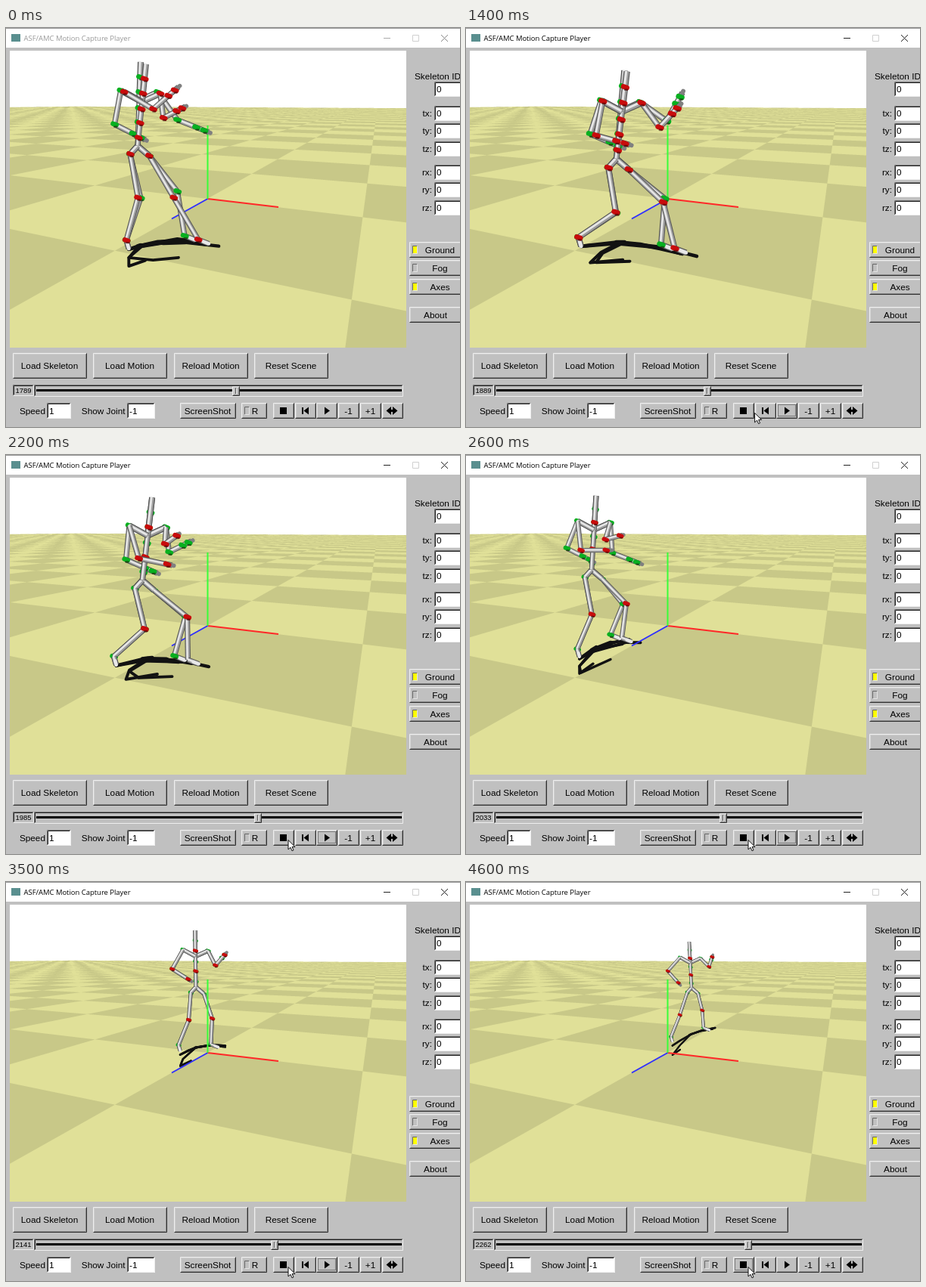
These frames come from a looping animation (600x528 px, 4700 ms). An HTML page with a canvas:

```html
<!DOCTYPE html>
<html lang="en">
<head>
<meta charset="utf-8">
<title>Motion Capture Player</title>
<style>
  html, body { margin: 0; width: 600px; height: 528px; overflow: hidden; background: #c0c0c0; }
  canvas, svg { position: absolute; display: block; }
  canvas { left: 5px; top: 30px; }
  svg { left: 0; top: 0; }
  text { font: 11.8px "Liberation Sans", Arial, sans-serif; white-space: pre; }
  .title { font: 9.45px "Open Sans", "Noto Sans", sans-serif; }
  .counter { font-size: 9.5px; }
</style>
</head>
<body>
<canvas id="floor" width="524" height="393"></canvas>
<canvas id="scene" width="524" height="393"></canvas>
<svg id="ui" width="600" height="528" viewBox="0 0 600 528"></svg>
<script>
const LOOP = 4700, STEP = 100, CLICK_PLAY = 567, CLICK_STOP = 4510;
const VIEW = { x: 5, y: 30, w: 524, h: 393, cx: 266, cy: 226, focal: 474 };
const lerp = (a, b, k) => a + (b - a) * k;
const mix = (p, q, k) => [lerp(p[0], q[0], k), lerp(p[1], q[1], k)];
const clamp = (v, low, high) => Math.min(Math.max(v, low), high);
const ramp = (t, from, to) => clamp((t - from) / (to - from), 0, 1);
const ease = (t, from, to) => { const k = ramp(t, from, to); return k * k * (3 - 2 * k); };

// ---------- Ground: a square checkerboard seen in perspective ----------
function paintFloor() {
  const ctx = document.getElementById('floor').getContext('2d');
  const image = ctx.createImageData(VIEW.w, VIEW.h);
  const pitch = 15 * Math.PI / 180, yaw = 24.7 * Math.PI / 180;
  const sp = Math.sin(pitch), cp = Math.cos(pitch), sy = Math.sin(yaw), cy = Math.cos(yaw);
  const tile = 0.4, extent = 50, sub = 4;
  const sky = [255, 255, 255], light = [224, 224, 152], dark = [200, 200, 136];

  function colorAt(px, py) {
    const dx = (px - VIEW.cx) / VIEW.focal, dy = (py - VIEW.cy) / VIEW.focal;
    const reach = sp / (sp + dy * cp);
    const right = reach * dx, toward = cp + reach * (dy * sp - cp);
    const u = Math.floor((right * cy + toward * sy) / tile);
    const v = Math.floor((toward * cy - right * sy) / tile);
    if (reach < 0 || u < -extent || v < -extent) return sky;
    return (u + v) % 2 ? light : dark;
  }
  for (let y = 0; y < VIEW.h; y++) for (let x = 0; x < VIEW.w; x++) {
    const sum = [0, 0, 0];
    for (let i = 0; i < sub * sub; i++) {
      const sample = colorAt(x + VIEW.x + (i % sub + .5) / sub, y + VIEW.y + (Math.floor(i / sub) + .5) / sub);
      sample.forEach((c, j) => { sum[j] += c / (sub * sub); });
    }
    image.data.set([...sum, 255], (y * VIEW.w + x) * 4);
  }
  ctx.putImageData(image, 0, 0);
}

// ---------- Key poses: ends of the body only, joints are solved ----------
const keys = [
  { time: 570, head: [178, 45], hips: [174, 156], handL: [184, 148], handR: [268, 138],
    footL: [159, 281], footR: [236, 275], twinL: [228, 78], twinR: [237, 104] },
  { time: 800, head: [210, 54], hips: [208, 170], handL: [187, 147], handR: [322, 79],
    footL: [160, 281], footR: [272, 286], twinR: [330, 99] },
  { time: 1900, head: [209, 58], hips: [191, 176], handL: [224, 168], handR: [256, 91],
    footL: [139, 274], footR: [246, 287], twinL: [241, 161], twinR: [244, 104] },
  { time: 2600, head: [172, 54], hips: [166, 152], handL: [168, 141], handR: [231, 144],
    footL: [147, 257], footR: [191, 238], twinL: [191, 126], twinR: [207, 106] },
  { time: 3100, head: [217, 58], hips: [215, 143], handL: [206, 136], handR: [264, 92],
    footL: [186, 223], footR: [229, 232] },
  { time: 3900, head: [283, 70], hips: [287, 135], handL: [283, 126], handR: [318, 96],
    footL: [270, 209], footR: [313, 198] },
  { time: 4500, head: [295, 79], hips: [298, 140], handL: [283, 136], handR: [326, 97],
    footL: [271, 205], footR: [314, 193] }
];

function poseAt(time) {
  const t = clamp(time, keys[0].time, keys[keys.length - 1].time);
  const i = Math.max(1, keys.findIndex(k => k.time >= t));
  const a = keys[i - 1], b = keys[i], k = (t - a.time) / (b.time - a.time);
  const at = (part, fallback = part) => mix(a[part] || a[fallback], b[part] || b[fallback], k);
  const own = {};
  for (const part of ['head', 'hips', 'handL', 'handR', 'footL', 'footR']) own[part] = at(part);

  // The second performer leans and steps apart, then falls into the same pose.
  const lean = 7 * (1 - ramp(t, 800, 1900)), apart = 1 - ramp(t, 2500, 3100);
  const twin = {
    ...own,
    head: [own.head[0] + lean, own.head[1] + lean * .4],
    handL: at('twinL', 'handL'),
    handR: at('twinR', 'handR'),
    footR: [own.footR[0] + 18 * apart, own.footR[1] + 5 * apart]
  };
  return [own, twin].map(solve);
}

// Middle joint of a two-bone limb, set off from the line between its ends.
function bend(from, to, length, fold, side) {
  const dx = to[0] - from[0], dy = to[1] - from[1], reach = Math.hypot(dx, dy);
  const off = side * fold * Math.sqrt(Math.max(0, length ** 2 - reach ** 2)) / 2;
  const [mx, my] = mix(from, to, .5);
  return [mx - dy / reach * off, my + dx / reach * off];
}

function solve({ head, hips, handL, handR, footL, footR }) {
  const size = Math.hypot(head[0] - hips[0], head[1] - hips[1]);
  const profile = clamp((size - 55) / 60, 0, 1);
  const chest = mix(head, hips, .46);
  const from = ([x, y], right, down) => [x + right * size, y + down * size];
  const arm = (shoulder, hand) => {
    const length = .8 * size;
    const reach = Math.hypot(hand[0] - shoulder[0], hand[1] - shoulder[1]);
    return [chest, shoulder, bend(shoulder, hand, length, Math.min(1.1, .25 + reach / length), 1), hand];
  };
  const leg = (hip, ankle, toe) => [hips, hip, bend(hip, ankle, 1.1 * size, .8 * profile, -1), ankle, toe];
  return {
    size, profile,
    spine: [head, chest, hips],
    armL: arm(from(chest, -.22, -.12), handL),
    armR: arm(from(chest, .22, -.1), handR),
    legL: leg(from(hips, -.09, .1), footL, from(footL, .03, .1)),
    legR: leg(from(hips, .14, .12), footR, from(footR, .13, .05))
  };
}

// ---------- Scene ----------
const ctx = document.getElementById('scene').getContext('2d');
ctx.translate(-VIEW.x, -VIEW.y);
ctx.lineJoin = 'round';

function line(pts, color, width, cap = 'butt') {
  ctx.beginPath();
  pts.forEach(p => ctx.lineTo(...p));
  ctx.strokeStyle = color;
  ctx.lineWidth = width;
  ctx.lineCap = cap;
  ctx.stroke();
}

function drawAxes() {
  const origin = [266.5, 226];
  line([origin, [360, 237]], '#ff2828', 2);
  line([origin, [219, 252.5]], '#3030ff', 2);
  line([origin, [266.5, 129]], '#38ff38', 2);
}

function bone(a, b, w) {
  const shift = ([x, y]) => [x - w * .1, y - w * .1];
  line([a, b], '#505050', w);
  line([a, b], '#9c9c9c', w * .75);
  line([shift(a), shift(b)], '#e6e6e6', w * .36);
}

function joint([x, y], w, color) {
  line([[x - w * .25, y - w * .1], [x + w * .3, y + w * .1]], color, w * .8, 'round');
  line([[x, y + w * .4], [x + w * .35, y + w * .4]], 'rgba(30,0,0,.5)', w * .3, 'round');
}

function drawFigure(figure, color, everyJoint) {
  const w = figure.size * .072;
  for (const part of ['legR', 'legL', 'armR', 'spine', 'armL']) {
    const chain = figure[part], last = chain.length - 1;
    for (let i = 1; i <= last; i++) bone(chain[i - 1], chain[i], w * (i > 1 ? .9 : 1));
    let joints = chain.slice(1);
    if (part === 'spine') joints = [.18, .36, .55, .72, .9].map(k => mix(chain[0], chain[2], k));
    if (part.startsWith('arm')) {
      const [elbow, hand] = chain.slice(-2);
      joints.splice(-1, 1, mix(elbow, hand, .6), mix(elbow, hand, .85));
      line([mix(elbow, hand, .92), mix(elbow, hand, 1.05)], '#808080', w * .7, 'round');
    }
    if (part.startsWith('leg')) {
      line([mix(chain[last - 1], chain[last], .5), chain[last]], '#e8e8e8', w * .55, 'round');
      joints.pop();
    }
    joints.forEach((at, i) => { if (everyJoint || i % 2) joint(at, w, color); });
  }
}

// Overhead light: each part falls on the line between the feet, arms to either side.
function drawShadow({ size, profile, spine, armL, armR, legL, legR }) {
  const away = .1 * size * (1 - profile);
  const [x0, y0] = legL[4], [toeX, toeY] = legR[4];
  const a = [x0, y0 + away], b = [toeX + size * .12, toeY + size * .04 - away];
  const fall = (pts, offset) => pts.map(([x], i) => {
    const k = clamp((x - a[0]) / (b[0] - a[0]), 0, 1);
    const [sx, sy] = mix(a, b, k);
    return [sx, sy + offset * size * Math.min(i, 2) / 2 - size * .08 * Math.sin(Math.PI * k)];
  });
  const draw = (pts, width) => line(pts, '#121212', size * width, 'round');
  draw(fall(armL, .2), .035);
  draw(fall(armR, .02), .035);
  draw(fall(spine, 0), .045);
  draw([a, ...fall([legL[2], legL[0], legR[2]], 0), b], .04);
}

function drawScene(figures) {
  const nearest = Math.max(...figures.map(f => Math.max(f.legL[4][1], f.legR[4][1])));
  const beyondOrigin = nearest < VIEW.cy;
  ctx.clearRect(VIEW.x, VIEW.y, VIEW.w, VIEW.h);
  figures.forEach(drawShadow);
  if (!beyondOrigin) drawAxes();
  drawFigure(figures[0], '#08b020', true);
  drawFigure(figures[1], '#c80c0c', figures[0].spine[0][0] !== figures[1].spine[0][0]);
  if (beyondOrigin) drawAxes();
}

// ---------- Interface ----------
const ui = document.getElementById('ui');

function add(tag, attrs, content = '') {
  const node = document.createElementNS('http://www.w3.org/2000/svg', tag);
  for (const name in attrs) node.setAttribute(name, attrs[name]);
  node.textContent = content;
  return ui.appendChild(node);
}
const rect = (x, y, width, height, fill) => add('rect', { x, y, width, height, fill });
const path = (d, fill = '#000', stroke = 'none') => add('path', { d, fill, stroke });
const label = (content, x, y, anchor = 'middle', cls = '') =>
  add('text', { x, y, 'text-anchor': anchor, class: cls }, content);

function bevel(x, y, w, h, topLeft, bottomRight, fill = 'none') {
  const l = x + .5, t = y + .5, r = x + w - .5, b = y + h - .5;
  rect(x, y, w, h, fill);
  path(`M${l} ${b}V${t}H${r}`, 'none', topLeft);
  path(`M${l} ${b}H${r}V${t}`, 'none', bottomRight);
}
function raised(x, y, w, h) {
  bevel(x, y, w, h, '#eee', '#303030', '#c0c0c0');
  bevel(x + 1, y + 1, w - 2, h - 2, '#d0d0d0', '#8a8a8a');
}
function sunken(x, y, w, h, fill = '#c0c0c0') {
  bevel(x, y, w, h, '#707070', '#eee', fill);
  bevel(x + 1, y + 1, w - 2, h - 2, '#222', fill);
}
function button(text, x, y, w, h) {
  raised(x, y, w, h);
  label(text, x + w / 2 - .5, y + h / 2 + 4);
}
function input(value, x, y, w, h) {
  sunken(x, y, w, h, '#fff');
  label(value, x + 3, y + h / 2 + 4, 'start');
}
function toggle(text, x, y, w, h, on, textX) {
  raised(x, y, w, h);
  bevel(x + 4, y + 5, 7, h - 10, '#666', '#e4e4e4', on ? '#ffff00' : '#c0c0c0');
  label(text, textX, y + h / 2 + 4);
}

rect(0, 0, 600, 26, '#fff');
rect(0, 0, 600, 1, '#999');
rect(7, 8, 12, 10, '#5a8f8f');
const title = label('ASF/AMC Motion Capture Player', 23.5, 16.5, 'start', 'title');
const minimise = path('M499 13.5H508', 'none');
path('M537.5 9.5H545.5V17.5H537.5Z', 'none', '#d0d0d0');
const close = path('M575 9L584 18M584 9L575 18', 'none');

label('Skeleton ID', 540, 68, 'start');
input('0', 566, 71, 36, 20);
['t', 'r'].forEach((kind, group) => ['x', 'y', 'z'].forEach((axis, i) => {
  const y = 103 + group * 78 + Math.round(i * 23.4);
  label(`${kind}${axis}:`, 563, y + 14, 'end');
  input('0', 566, y, 36, 20);
}));
['Ground', 'Fog', 'Axes'].forEach((name, i) =>
  toggle(name, 533, 283 + Math.round(i * 24.4), 70, 21, name !== 'Fog', 573.5));
button('About', 533, 369, 70, 21);

['Load Skeleton', 'Load Motion', 'Reload Motion', 'Reset Scene'].forEach((name, i) =>
  button(name, 9 + Math.round(i * 106.4), 430, 98, 34));

sunken(9, 472, 28, 15);
const counter = label('', 23, 483, 'middle', 'counter');
sunken(37, 472, 488, 16);
rect(40, 478, 483, 3, '#000');
const knob = add('g', {});
const beforeKnob = ui.childNodes.length;
raised(-5, 474, 10, 13);
bevel(-1, 476, 2, 9, '#555', '#eee');
knob.append(...[...ui.childNodes].slice(beforeKnob));

label('Speed', 52, 510.5, 'end');
input('1', 54, 496, 32, 21);
label('Show Joint', 157.5, 510.5, 'end');
input('-1', 160, 496, 37, 21);
button('ScreenShot', 230, 496, 74, 21);
toggle('R', 311, 496, 34, 21, false, 329);
['', '', '', '-1', '+1', ''].forEach((name, i) => button(name, 353 + Math.round(i * 28.7), 496, 28, 21));
path('M362 502H371V511H362Z');
path('M391 502H393V511H391ZM400 501.5V511.5L393.5 506.5Z');
path('M421 501.5V511.5L428 506.5Z');
path('M502.5 506.5L509 501V505H511V501L517.5 506.5L511 512V508H509V512Z');

const focus = add('rect', { y: 498.5, width: 23, height: 15, fill: 'none', stroke: '#333', 'stroke-dasharray': '1 1' });
const cursor = path('M0 0V12.5L3 9.8L5 14.3L7 13.4L5.1 9.1H9Z', '#fff', '#111');

function cursorAt(t) {
  const play = [428, 508.5], stop = [373, 509.5];
  const arriving = mix([440, 545], play, ease(t, 200, 500));
  return mix(arriving, stop, ease(t, 1100, 1500));
}

function render(t) {
  const active = t >= 500, stopped = t >= CLICK_STOP - STEP / 2;
  const played = Math.round(.12 * (clamp(t, CLICK_PLAY, CLICK_STOP) - CLICK_PLAY));
  drawScene(poseAt(t));
  counter.textContent = 1789 + played;
  knob.setAttribute('transform', `translate(${Math.round(304 + played * .146)} 0)`);
  title.setAttribute('fill', active ? '#000' : '#999');
  minimise.setAttribute('stroke', active ? '#222' : '#aaa');
  close.setAttribute('stroke', active ? '#222' : '#888');
  focus.setAttribute('visibility', active ? 'visible' : 'hidden');
  focus.setAttribute('x', stopped ? 355.5 : 412.5);
  cursor.setAttribute('transform', `translate(${cursorAt(t).join(' ')})`);
}

paintFloor();
const start = performance.now();
function tick() {
  const elapsed = (performance.now() - start) % LOOP;
  render(Math.floor(elapsed / STEP) * STEP);
  requestAnimationFrame(tick);
}
tick();
</script>
</body>
</html>
```
